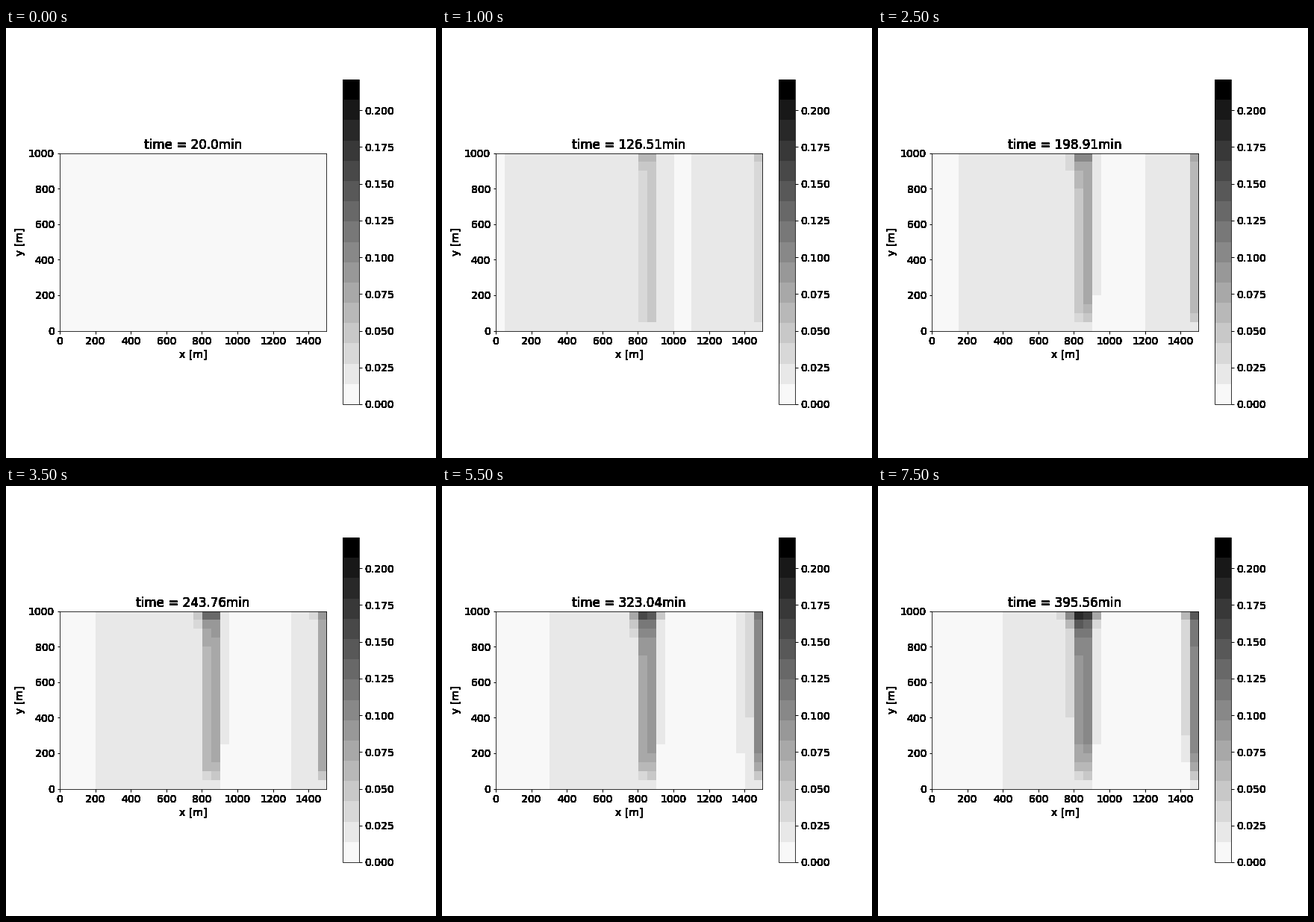
Animation, 576 px wide and 576 px high, one loop 8000 ms. Source, as a matplotlib script:

```python
import numpy as np
import matplotlib.pyplot as plt
from matplotlib.animation import FuncAnimation
from matplotlib.colors import ListedColormap

plt.rcParams.update({"font.family": "DejaVu Sans", "font.size": 14,
                     "xtick.major.width": 1, "ytick.major.width": 1})

STEPS = 16
ROWS, COLS = 20, 30
LEVELS, VMAX = 16, 0.2208
KEYS = [0, 1, 2, 5, 7, 9, 11, 15]
MINUTES = [20, 99.8, 126.51, 198.91, 243.76, 284.78, 323.04, 395.56]
FRONT = [20, 20, 22, 24, 26, 27, 27.2, 28.15]

row, col = np.mgrid[:ROWS, :COLS]
height = np.arange(ROWS)
depth = ROWS - 1 - height


def wall(step, rate, power, cap, lift, delay, decay):
    """Pile-up along a wall: limited near the bottom, highest at the top."""
    body = min(rate * step ** power, 7.9)
    foot = 2.8 * cap * (height + 0.3) ** 0.6
    top = lift * min(1, step / delay) * decay ** depth
    return np.minimum(body, foot) * (1 + top)


def halo(step, seep, gain, power, decay):
    """Slow spill into a column beside a wall."""
    spread = seep * step * np.minimum(1, height / 8)
    return 0.95 + spread + gain * step ** power * decay ** depth


def field(step):
    f = np.full((ROWS, COLS), 1.2)
    f[:, 14] = halo(step, 0, 0.005, 2, 0.3)
    f[:, 15] = halo(step, 0.07, 0.335, 1, 0.42)
    f[:, 16] = wall(step, 1.53, 0.54, 0.875, 1.09, 2, 0.52)
    f[:, 17] = wall(step, 2.75, 0.38, 1, 0.6, 7, 0.3)
    f[:, 18] = 0.1 + halo(step, 0, 0.019, 2, 0.3)
    f[:, 28] = halo(step, 0.1, 0.0075, 2, 0.3)
    f[:, 29] = wall(step, 2.05, 0.515, 1.13, 0.28, 15, 0.45)
    # The edge halos never start below the surrounding level.
    f = np.maximum(f, 1) * min(1, 0.69 * step)

    # Cleared zones grow to the right, the last column from the bottom up.
    front = np.interp(step, KEYS, FRONT)
    start = 20 if step < 4 else 19
    if step > 1:
        f[col < (step + 1) // 2] = 0
        f[(col >= start) & (col + row / ROWS < front - 1e-6)] = 0
    if step > 3:
        f[:min(step - 1, 5), 18] = 0
    return (np.floor(f) + 0.5) / LEVELS * VMAX


def heavy(text):
    """Overprint a text so that its soft edges turn solid."""
    draw = text.draw

    def overprint(renderer):
        for _ in range(24):
            draw(renderer)
    text.draw = overprint


grays = [str((248 - 16 * i) / 255) for i in range(LEVELS - 1)] + ["black"]

fig, ax = plt.subplots(figsize=(8, 8), dpi=72)
fig.subplots_adjust(left=0.125, right=0.9, bottom=0.125, top=0.88)
image = ax.imshow(field(0), cmap=ListedColormap(grays), vmin=0, vmax=VMAX,
                  origin="lower", extent=(0, 1500, 0, 1000),
                  interpolation="nearest")
ax.set_xticks(range(0, 1500, 200))
ax.set_yticks(range(0, 1001, 200))
ax.set_xlabel("x [m]")
ax.set_ylabel("y [m]")
title = ax.set_title("")
bar = fig.colorbar(image, ax=ax, ticks=np.arange(9) * 0.025)

for t in [title, ax.xaxis.label, ax.yaxis.label, *ax.get_xticklabels(),
          *ax.get_yticklabels(), *bar.ax.get_yticklabels()]:
    heavy(t)


def update(step):
    image.set_data(field(step))
    minutes = round(float(np.interp(step, KEYS, MINUTES)), 2)
    title.set_text(f"time = {minutes}min")
    return image, title


anim = FuncAnimation(fig, update, frames=STEPS, interval=500,
                     repeat=True, repeat_delay=0)
plt.show()
```
